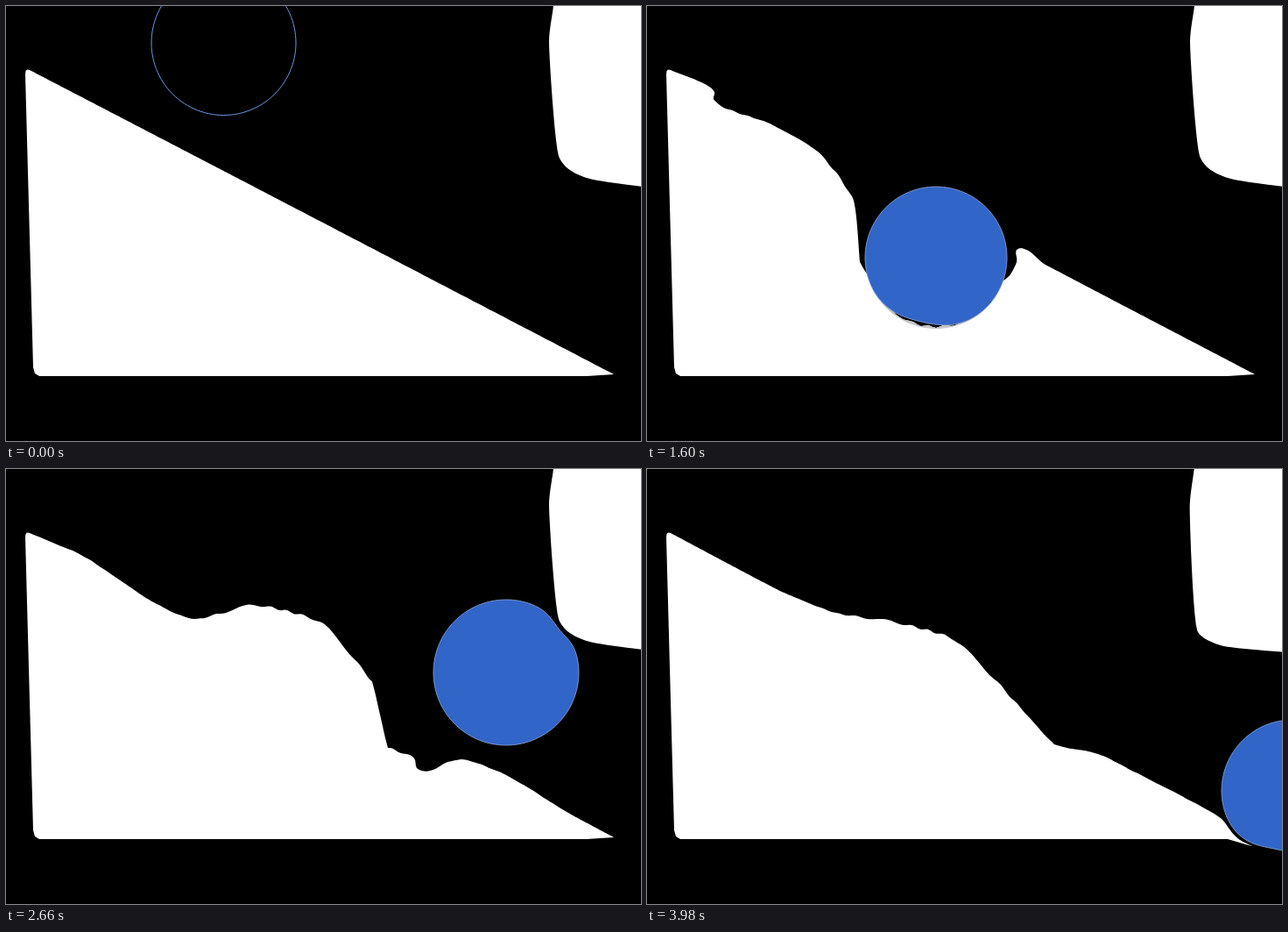
Recreate the animation shown at these times as an HTML page with a canvas. Size 725 by 496 pixels, loop 4 s.

```html
<!DOCTYPE html>
<html lang="en">
<head>
<meta charset="utf-8">
<title>Ball on a soft slope</title>
<style>
html, body { margin: 0; width: 100%; height: 100%; overflow: hidden; background: #000; }
canvas { display: block; width: 725px; height: 496px; }
</style>
</head>
<body>
<canvas id="stage" width="725" height="496"></canvas>
<script>
const ctx = document.getElementById('stage').getContext('2d');
const LOOP = 4000, STEP = 20;
const COUNTS = [120, 50, 100];
const TOP = [27, 73], TIP = [694, 420];
const BLOCK = pairs([625, 0, 620, 40, 631, 171, 640, 184, 663, 196, 726, 206]);
const PUSHED = pairs([626, 0, 621, 35, 640, 126, 660, 160, 685, 178, 726, 197]);

function pairs(a) {
  return Array.from({ length: a.length / 2 }, (_, i) => [a[2 * i], a[2 * i + 1]]);
}

const mix = (a, b, u) => a + (b - a) * u;
const bell = (x, width) => Math.exp(-((x / width) ** 2));
const rampY = x => TOP[1] + (x - TOP[0]) * 0.5195;

function hermite(a, b, ma, mb, u) {
  const u2 = u * u, u3 = u2 * u;
  return (2 * u3 - 3 * u2 + 1) * a + (u3 - 2 * u2 + u) * ma
    + (3 * u2 - 2 * u3) * b + (u3 - u2) * mb;
}

// Rounded curve through the points; short tangents keep long runs straight.
function smooth(p) {
  const unit = (a, b) => {
    const l = Math.hypot(b[0] - a[0], b[1] - a[1]) || 1;
    return [(b[0] - a[0]) / l, (b[1] - a[1]) / l];
  };
  const dir = p.map((q, i) => {
    const a = unit(p[Math.max(i - 1, 0)], q), b = unit(q, p[Math.min(i + 1, p.length - 1)]);
    return unit([0, 0], [a[0] + b[0], a[1] + b[1]]);
  });
  const out = [p[0]];
  for (let i = 1; i < p.length; i++) {
    const a = p[i - 1], b = p[i];
    const m = Math.min(40, Math.hypot(b[0] - a[0], b[1] - a[1]));
    for (let k = 1; k <= 10; k++) {
      out.push([0, 1].map(c => hermite(a[c], b[c], dir[i - 1][c] * m, dir[i][c] * m, k / 10)));
    }
  }
  return out;
}

// Evenly spaced samples along a polyline, as a flat list.
function resample(p, n) {
  const len = [0];
  for (let i = 1; i < p.length; i++) {
    len.push(len[i - 1] + Math.hypot(p[i][0] - p[i - 1][0], p[i][1] - p[i - 1][1]));
  }
  const out = [];
  let j = 1;
  for (let k = 0; k < n; k++) {
    const d = len[len.length - 1] * k / (n - 1);
    while (j < p.length - 1 && len[j] < d) j++;
    const u = (d - len[j - 1]) / (len[j] - len[j - 1] || 1);
    for (const c of [0, 1]) out.push(mix(p[j - 1][c], p[j][c], u));
  }
  return out;
}

// The slope between two points: an arc under a held ball, else a straight run.
function bowl({ x, y, r, held }, from, to) {
  if (!held) return [from, to];
  const a = Math.atan2(from[1] - y, from[0] - x), b = Math.atan2(to[1] - y, to[0] - x);
  const start = a < 0 ? a + Math.PI * 2 : a, arc = [];
  for (let k = 1; k < 12; k++) {
    const angle = mix(start, b, k / 12);
    arc.push([x + (r - 2) * Math.cos(angle), y + (r - 2) * Math.sin(angle)]);
  }
  return [from, ...arc, to];
}

// press dents the ball from below, side dents it towards the block, push moves the block.
const keys = [];
function pose(t, [x, y, r], { press = 0, side = 0, push = 0, held = 0 }, left, right, end = TIP) {
  const l = [TOP, ...pairs(left)], e = [...pairs(right), end];
  const parts = [smooth(l), bowl({ x, y, r, held }, l[l.length - 1], e[0]), smooth(e)];
  const land = parts.flatMap((p, i) => resample(p, COUNTS[i]));
  keys.push({ t, v: [x, y, r, press, side, push, held, ...land] });
}

const flat = [[205, rampY(205)], [290, rampY(290)]];
pose(0, [248.5, 42, 82.5], {}, ...flat);
pose(110, [248.5, 94, 82], {}, ...flat);
pose(400, [253, 197, 79], { press: 4, held: 1 },
  [140, 131, 167, 155, 174, 200], [322, 236, 331, 228, 352, 241]);
pose(880, [268, 296, 76], { press: 6, held: 1 },
  [110, 112, 117, 129, 150, 160, 180, 228, 191, 292], [343, 318, 356, 282, 378, 258, 390, 261]);
pose(1600, [330, 287, 81], { press: 6, held: 1 },
  [77, 98, 76, 107, 140, 134, 195, 166, 235, 220, 243, 292],
  [403, 319, 422, 293, 423, 277, 455, 295]);
pose(1960, [418, 264, 79], { press: 6, held: 1 },
  [66, 98, 150, 128, 196, 129, 245, 148, 300, 224, 341, 298],
  [476, 308, 488, 283, 494, 290, 486, 310]);
pose(2660, [571, 232, 83], { side: 5 },
  [88, 99, 170, 153, 215, 171, 283, 155, 360, 175, 418, 242],
  [436, 318, 466, 331, 470, 343, 520, 331, 575, 351, 640, 391]);
pose(3220, [656, 255, 84], { side: 11, push: 1 },
  [120, 122, 175, 149, 204, 168, 258, 244, 335, 240, 392, 247],
  [425, 267, 478, 309, 545, 347, 640, 392]);
pose(3980, [737, 367, 81], { press: 12, push: -0.3 },
  [152, 139, 215, 164, 280, 174, 350, 194, 400, 243],
  [465, 315, 515, 325, 550, 342, 655, 398, 670, 417], [692, 431]);

// Monotone cubic interpolation between poses.
function stateAt(t) {
  const last = keys.length - 1;
  if (t >= keys[last].t) return keys[last].v;
  let i = 0;
  while (t >= keys[i + 1].t) i++;
  const h = keys[i + 1].t - keys[i].t, u = (t - keys[i].t) / h;
  const slope = (k, c) => (keys[k + 1].v[c] - keys[k].v[c]) / (keys[k + 1].t - keys[k].t);
  const tangent = (k, c) => {
    if (k === 0) return slope(0, c);
    if (k === last) return slope(last - 1, c);
    const a = slope(k - 1, c), b = slope(k, c);
    return a * b > 0 ? 2 * a * b / (a + b) : 0;
  };
  return keys[i].v.map((a, c) =>
    hermite(a, keys[i + 1].v[c], tangent(i, c) * h, tangent(i + 1, c) * h, u));
}

// Small lumps wherever the slope has left its first line.
function ripple([x, y]) {
  const moved = Math.min(1, Math.abs(y - rampY(x)) / 20);
  return [x, y + 1.3 * moved * Math.sin(x / 4 + 2 * Math.sin(x / 17))];
}

function shape(points) {
  const path = new Path2D();
  points.forEach(([x, y]) => path.lineTo(x, y));
  path.closePath();
  return path;
}

function ballPath(x, y, r, press, side) {
  const toBlock = Math.atan2(130 - y, 695 - x), points = [];
  for (let a = -Math.PI / 2; a < Math.PI * 1.5; a += Math.PI / 60) {
    const off = Math.atan2(Math.sin(a - toBlock), Math.cos(a - toBlock));
    const d = r - press * bell(a - 1.8, 0.5) - side * bell(off, 0.25);
    points.push([x + d * Math.cos(a), y + d * Math.sin(a)]);
  }
  return shape(points);
}

function draw(t) {
  const [x, y, r, press, side, push, held, ...line] = stateAt(t);
  const block = BLOCK.map((p, i) => p.map((v, c) => mix(v, PUSHED[i][c], push)));
  const land = shape([[31, 412], [22, 78], [22.5, 74], [24, 72.5],
    ...pairs(line).map(ripple), [663, 422], [38, 422], [33, 419]]);

  ctx.fillStyle = '#000';
  ctx.fillRect(0, 0, 725, 496);
  ctx.fillStyle = '#fff';
  ctx.fill(shape([...smooth(block), [726, 0]]));
  ctx.fill(land);

  const ball = ballPath(x, y, r, press, side);
  ctx.lineWidth = 1;
  if (t < STEP) {
    ctx.strokeStyle = '#6f93e0';
    ctx.stroke(ball);
    return;
  }
  if (held > 0.5) {
    ctx.save();
    ctx.clip(land);
    ctx.fillStyle = '#c6c6c8';
    ctx.fill(ballPath(x, y + 1, r - 1, 0, 0));
    ctx.restore();
  }
  ctx.fillStyle = '#3265c8';
  ctx.fill(ball);
  ctx.strokeStyle = '#8fa6d6';
  ctx.lineWidth = 0.8;
  ctx.stroke(ball);
}

const start = performance.now();
function tick() {
  const t = (performance.now() - start) % LOOP;
  draw(Math.floor(t / STEP) * STEP);
  requestAnimationFrame(tick);
}
tick();
</script>
</body>
</html>
```
